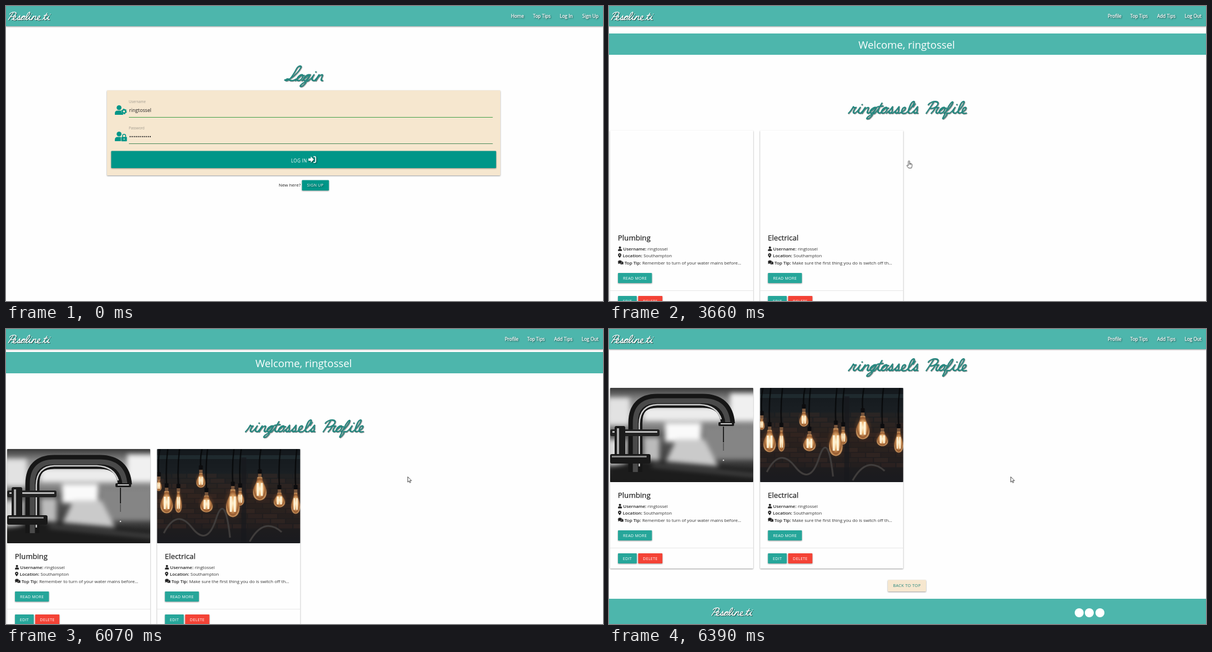
Write an HTML page that moves like this. It is 1064 px wide and 526 px high and loops after 8000 ms.

```html
<!DOCTYPE html>
<html lang="en">
<head>
<meta charset="utf-8">
<title>Login to profile</title>
<style>
html, body { margin: 0; width: 100%; height: 100%; overflow: hidden; background: #fefefe; }
svg { display: block; width: 1064px; height: 526px; font-family: "Open Sans", "Noto Sans", sans-serif; }
text { white-space: pre; }
.mid { text-anchor: middle; }
.caps { letter-spacing: .3px; fill: #fff; text-anchor: middle; }
.bold { font-weight: 600; fill: #222; }
.lift { filter: drop-shadow(0 1px 1px #0006); }
.glow { filter: drop-shadow(1px 1px 1px #0009); }
.blur { filter: blur(4px); }
.script { fill: none; stroke-linecap: round; stroke-linejoin: round; }
.heading { stroke: #26877f; stroke-width: 1.9; filter: drop-shadow(1.5px 1.5px .6px #0006); }
.brand { stroke: #fff; stroke-width: 1.7; filter: drop-shadow(1px 1px .6px #0008); }

.login, .profile, .status, .bulbs, .tap, .arrow, .hand, .click, .hover, .scroll {
  animation: 8s step-end infinite;
}
.login { animation-name: login; }
.profile { animation-name: profile; }
.status { animation-name: status; }
.bulbs { animation-name: bulbs; }
.tap { animation-name: tap; }
.arrow { animation-name: arrow; }
.hand { animation-name: hand; }
.click { animation-name: click; }
.hover { animation-name: hover; }
.scroll { animation-name: scroll; }
.cursor { animation: move 8s linear infinite; }

@keyframes login { 0% { opacity: 1 } 44.875%, 100% { opacity: 0 } }
@keyframes profile { 0% { opacity: 0 } 44.875%, 100% { opacity: 1 } }
@keyframes status { 0% { opacity: 0 } 46.625% { opacity: 1 } 51.625% { opacity: .6 } 52.5% { opacity: .25 } 53.375%, 100% { opacity: 0 } }
@keyframes bulbs { 0% { opacity: 0 } 49.125%, 100% { opacity: 1 } }
@keyframes tap { 0% { opacity: 0 } 50.75%, 100% { opacity: 1 } }
@keyframes arrow { 0% { opacity: 0 } 4.125% { opacity: 1 } 26% { opacity: 0 } 40% { opacity: 1 } 40.75% { opacity: 0 } 56.625%, 100% { opacity: 1 } }
@keyframes hand { 0% { opacity: 0 } 26% { opacity: 1 } 40% { opacity: 0 } 40.75% { opacity: 1 } 56.625%, 100% { opacity: 0 } }
@keyframes click { 0% { opacity: 0 } 40% { opacity: .85 } 40.75%, 100% { opacity: 0 } }
@keyframes hover { 0% { opacity: 0 } 26%, 100% { opacity: 1 } }
@keyframes scroll {
  0% { transform: none }
  75.875% { transform: translateY(-8px) }
  76.625% { transform: translateY(-29px) }
  77.5% { transform: translateY(-62px) }
  78.25% { transform: translateY(-92px) }
  79.125% { transform: translateY(-111px) }
  79.875%, 100% { transform: translateY(-117px) }
}
@keyframes move {
  0%, 4.125% { transform: translate(998px, 484px) }
  6.3% { transform: translate(905px, 443px) }
  8.5%, 11% { transform: translate(869px, 462px) }
  14.375%, 17% { transform: translate(873px, 453px) }
  21.875% { transform: translate(637px, 335.5px); animation-timing-function: ease-out }
  27.125%, 27.875% { transform: translate(537px, 279px) }
  28.75%, 55.875% { transform: translate(534.5px, 276px) }
  60.125%, 100% { transform: translate(715.5px, 263px) }
}
</style>
</head>
<body>
<script>
const USER = "ringtossel", BRAND = "Pesoline.ti", TEAL = "#4db6ac", DEEP = "#009688", SAND = "#f6e7cf";

// Script letters as relative strokes: each starts and ends on the baseline, so words are plain joins.
const STROKES = {
  e: "c4-2 6-4 6-6c0-3-4-3-4 1c0 5 3 6 7 5",
  i: "q3-3 4-8c-1 5-1 8 4 8m-3-12l.1 0m2.9 12",
  n: "q2-3 3-8l-1 8c1-5 3-8 5-8c3 0-1 8 4 8",
  l: "c4-4 6-10 6-14c0-4-4-3-4 3c0 7 0 11 4 11",
  t: "q3-5 4-14c-2 9-2 14 3 14m-7-9l7-1m0 10",
  s: "q4-4 5-9c0 3 3 5 2 8c-1 2-4 1-4-1m3 1q1 1 3 1",
  r: "q2-3 3-9q1 2 4 1c-2 4-2 8 2 8",
  o: "q2-3 6-8c-5-1-7 8-2 8c4 0 5-6 2-8q1 2 3 1m0 7",
  g: "q2-3 7-8c-6-1-8 8-3 8c2 0 3-3 4-8c-1 8-2 16-6 16c-4 0 0-6 7-8",
  f: "c4-4 7-11 6-15c-1-3-4 3-4 10l-1 12c1 3 5-4 3-7l4 0",
  L: "m-2-1c8 1 14-10 15-16c1-4-4-4-5 0c-1 8-3 17-7 17c-4 0-1-4 3-1c4 2 6 1 9-1m0 2",
  P: "m4 0c1-4 3-11 4-15m-6 3c2-6 15-6 13 1c-1 4-6 5-9 4m5 7",
  "'": "m2-13l-1 4m1 9",
  ".": "m2 0l.1 0m2.9 0",
  " ": "m8 0"
};

const script = (x, y, scale, word, cls) =>
  `<g class="${cls}"><path class="script" role="img" aria-label="${word}" transform="translate(${x} ${y}) scale(${scale}) skewX(-22)" d="M0 0${[...word].map(c => STROKES[c]).join("")}"/></g>`;
const text = (x, y, size, str, attrs = "") => `<text x="${x}" y="${y}" font-size="${size}" ${attrs}>${str}</text>`;
const rect = (x, y, w, h, fill, attrs = "") => `<rect x="${x}" y="${y}" width="${w}" height="${h}" fill="${fill}" ${attrs}/>`;
const path = (d, attrs) => `<path d="${d}" ${attrs}/>`;
const line = (d, color, width) => path(d, `fill="none" stroke="${color}" stroke-width="${width}"`);
const group = (x, y, body, cls = "") => `<g transform="translate(${x} ${y})"><g class="${cls}">${body}</g></g>`;
const button = (x, y, w, h, fill, label, size = 7, color = "#fff") =>
  rect(x, y, w, h, fill, 'rx="1" class="lift"') +
  text(x + w / 2, y + h / 2 + size * .37, size, label, `class="caps" style="fill:${color}"`);

const person = (x, y, s, fill) =>
  group(x, y, `<g transform="scale(${s})" fill="${fill}"><circle cx="7.5" cy="4.3" r="4.3"/><path d="M0 17v-2.5q0-5 5-5h5q5 0 5 5V17z"/></g>`);

const nav = items => `<g class="lift">${rect(0, 0, 1064, 36, TEAL)}</g>` +
  script(1, 24.5, .83, BRAND, "brand") +
  `<g class="glow" fill="#fff" stroke="#fff" stroke-width=".25">${items.map(([x, s]) => text(x, 21.3, 8.1, s)).join("")}</g>`;

function field(y, label, value, lineColor, badge) {
  return person(194, y + 26.5, 1, DEEP) + badge +
    text(219, y + 22, 6.2, label, 'fill="#a09a8e"') + value +
    rect(219, y + 47.5, 648.5, 1, lineColor);
}

const cog = group(210.3, 188, `<circle r="4.8" fill="${SAND}"/><circle r="3" fill="none" stroke="${DEEP}" stroke-width="2.4"/>
  <circle r="4.3" fill="none" stroke="${DEEP}" stroke-width="1.4" stroke-dasharray="2.25"/>`);
const lock = rect(204.7, 232, 12, 10, SAND) + rect(205.5, 233.5, 10, 7.7, DEEP, 'rx="1"') +
  line("M207.7 234v-2.5a2.8 2.8 0 0 1 5.6 0v2.5", DEEP, 1.5) + `<circle cx="210.5" cy="237.3" r="1.1" fill="${SAND}"/>`;
const enterIcon = group(539, 267.5, path("M0 4.2h4.2V.8L9.800 6.300 4.200 11.800V8.400H0z", 'fill="#fff"') +
  line("M9 1.2h2.3q1.5 0 1.5 1.5v7.2q0 1.5-1.5 1.5H9", "#fff", 1.8), "glow");

const loginPage = `<g class="login">` + rect(0, 0, 1064, 526, "#fefefe") +
  nav([[900, "Home"], [939.3, "Top Tips"], [987, "Log In"], [1027, "Sign Up"]]) +
  script(499, 133, 1.3, "Login", "heading") +
  rect(180, 150.5, 701, 151.5, SAND, 'rx="1" class="lift"') +
  field(150.5, "Username", text(219.5, 188.5, 8.7, USER, 'fill="#222"'), "#43a047", cog) +
  field(197.5, "Password", text(219.5, 236.2, 9.5, "•".repeat(11), 'fill="#222"'), "#4a8a5a", lock) +
  `<g class="hover">${rect(187.5, 260, 686, 30.5, "#0005", 'rx="1" style="filter:blur(1px)"')}</g>` +
  rect(187.5, 258.5, 686, 30.5, DEEP, 'rx="1" class="lift"') +
  text(522.2, 278.5, 8.1, "LOG IN", 'class="caps"') + enterIcon +
  text(486, 321.8, 8, "New here?", 'fill="#222"') +
  `<g class="lift">${rect(527.5, 310.5, 48, 18.5, DEEP, 'rx="1"')}</g>` +
  text(551.3, 322.4, 7, "SIGN UP", 'class="caps glow"') + `</g>`;

// Centre and half-size of each bulb.
const BULBS = [[3, 65, 5, 10], [17, 95, 11, 20], [38, 95, 6, 19], [78, 56, 8, 13], [88, 98, 11, 15],
  [148, 88, 7, 13], [135, 97, 12, 25], [183, 71, 12, 21], [218, 91, 10, 13], [247, 97, 8, 19]];

function bulbPhoto() {
  let bricks = "";
  for (let row = 0; row < 11; row++)
    for (let col = 0; col < 10; col++)
      bricks += rect(col * 27 - row % 2 * 13, 44 + row * 9, 25, 7.5, "#70452f", `opacity="${(.06 + (row * 7 + col * 5) % 4 * .04).toFixed(2)}"`);
  const pear = "M-.35-1C-.4-.4-1-.3-1 .3C-1 1.2 1 1.2 1 .3C1-.3 .4-.4 .35-1z";
  const lamps = BULBS.map(([x, y, w, h]) =>
    line(`M${x + 2} 0Q${x - 2} ${y / 3} ${x} ${y - h - 10}`, "#060708", 2) +
    rect(x - 3.5, y - h - 14, 7, 8, "#0c0c0e", 'rx="1.5"') +
    rect(x - 3, y - h - 6, 6, 7, "#77553c") +
    `<ellipse cx="${x}" cy="${y}" rx="${w * 1.4}" ry="${h * 1.2}" fill="url(#halo)"/>` +
    path(pear, `transform="translate(${x} ${y}) scale(${w} ${h})" fill="url(#lamp)"`) +
    line(`M${x - w * .3} ${y - h * .5}v${h * 1.1}M${x + w * .3} ${y - h * .5}v${h * 1.1}`, "#fff6dc", w * .3)).join("");
  return rect(0, 0, 255, 168, "url(#wall)") + bricks +
    rect(0, 11, 255, 7, "#26343a", 'opacity=".6"') + rect(150, 15, 9, 153, "#17191d", 'opacity=".7"') +
    line("M12 150Q35 105 62 140T105 125T130 158M165 165Q190 120 222 148", "#413e3d", 3) + lamps;
}

function tapPhoto() {
  const spout = "M45 150V62Q45 23 84 23H165Q207 23 210 64";
  return rect(0, 0, 255, 168, "url(#room)") +
    `<g class="blur">` +
    rect(-5, 18, 40, 48, "#e2e2e2") + rect(60, 34, 140, 24, "#ececec") + rect(214, 10, 50, 48, "#f0f0f0") +
    rect(165, 68, 95, 60, "#858585") + rect(98, 62, 64, 34, "#fafafa") +
    path("M118 92h50l28 54H92z", 'fill="#cacaca"') +
    rect(-5, 92, 34, 46, "#dadada") + rect(60, 88, 28, 44, "#bbb") +
    path("M60 128L260 146V170H0V140z", 'fill="#1c1c1c"') + line("M75 138L260 156", "#777", 3) + `</g>` +
    line(spout, "#161616", 25) + line(spout, "#4a4a4a", 9) +
    line("M52 140V64Q53 31 84 30H160Q190 31 198 56", "#cfcfcf", 2.5) +
    rect(193, 61, 28, 7, "#1c1c1c", 'rx="2"') + rect(197, 63, 20, 2, "#ccc") +
    rect(0, 74, 88, 12, "#222", 'rx="3"') + rect(4, 77, 80, 3, "#bbb") +
    rect(8, 68, 19, 64, "#1b1b1b", 'rx="3"') + rect(12, 72, 4, 54, "#aaa") +
    rect(0, 118, 72, 17, "#191919", 'rx="3"') + rect(3, 121, 62, 3, "#888") +
    line("M202 69V97", "#222", 2) + line("M202 98V112", "#444", 1.2) +
    `<circle cx="202" cy="129" r="1.8" fill="#ddd" stroke="#444" stroke-width=".7"/>`;
}

const pin = path("M3 0a2.9 2.9 0 0 0-2.9 2.9Q.1 4.5 3 8 5.9 4.5 5.9 2.9A2.9 2.9 0 0 0 3 0zm0 1.9a1 1 0 1 1 0 2 1 1 0 0 1 0-2z", 'fill="#222"');
const chat = `<ellipse cx="6.3" cy="4.7" rx="3.4" ry="2.7" fill="#222"/><path d="M7 6l2.7 2-.7-3z" fill="#222"/>
  <ellipse cx="3.5" cy="3" rx="3.7" ry="3" fill="#222" stroke="#fefefe" stroke-width=".5"/><path d="M0 6.7l1-3 2 2z" fill="#222"/>`;

function card(x, title, tip, photo, cls) {
  const row = (tx, y, label, value) =>
    text(tx, y, 7.9, `<tspan class="bold">${label}:</tspan> ${value}`, 'fill="#333"');
  return group(x, 222,
    rect(0, 0, 255, 322, "#fefefe", 'rx="1" class="lift"') +
    `<g class="${cls}" clip-path="url(#frame)">${photo}</g>` +
    text(13.8, 196, 13.2, title, 'fill="#222" stroke="#222" stroke-width=".25"') +
    person(14, 206.8, .47, "#222") + row(23.3, 213.8, "Username", USER) +
    group(14, 219, pin) + row(22.6, 226.2, "Location", "Southampton") +
    group(14, 231.3, chat) + row(25.7, 238.5, "Top Tip", tip) +
    button(14, 254, 60.5, 18, "#26a69a", "READ MORE") +
    rect(0, 285, 255, .7, "#ddd") +
    button(14, 295, 33.5, 18, "#26a69a", "EDIT") +
    button(50, 295, 43.2, 18, "#f44336", "DELETE"));
}

const profilePage = `<g class="profile">` + rect(0, 0, 1064, 526, "#fefefe") +
  `<g class="scroll">` +
  rect(0, 49, 1064, 38, TEAL) + text(530.5, 75.5, 18.4, `Welcome, ${USER}`, 'class="mid" fill="#fff"') +
  script(427, 191, 1.27, `${USER}'s Profile`, "heading") +
  card(2, "Plumbing", "Remember to turn of your water mains before...", tapPhoto(), "tap") +
  card(269.3, "Electrical", "Make sure the first thing you do is switch off th...", bulbPhoto(), "bulbs") +
  button(497, 564.5, 68, 20.5, SAND, "BACK TO TOP", 7.4, "#26877f") +
  rect(0, 598, 1064, 45, TEAL) + script(180, 627.5, .81, BRAND, "brand") +
  [838, 856, 875].map(x => `<circle cx="${x}" cy="623" r="8" fill="#fff"/>`).join("") + `</g>` +
  nav([[889, "Profile"], [929, "Top Tips"], [977, "Add Tips"], [1026, "Log Out"]]) +
  `<g class="status">${rect(-1, 514, 356, 13, "#dee1e6", 'stroke="#c4c7cb" stroke-width=".6"')}` +
  text(0, 522.6, 6.2, "Waiting for 4310-velvet-weevil-3kvdm5t2.qx-na07.tallod.zz...", 'fill="#555"') + `</g></g>`;

const cursor = `<circle class="click" cx="533.5" cy="275.5" r="6.5" fill="#a9cf38"/><g class="cursor" stroke-linejoin="round">` +
  path("M.5 .5V10L2.7 8 4.2 11.3 5.7 10.6 4.2 7.4H7.2z", 'class="arrow" fill="#fff" stroke="#333" stroke-width=".9"') +
  path("M-1 1.3a1.2 1.2 0 0 1 2.4 0V4.7L4.3 5.2Q5.8 5.6 5.6 7.2V9.3L4.5 13H-.5L-3.8 8.6Q-3.4 6.9-1 8.5zM1.4 4.7V7M3.3 5V7", 'class="hand" fill="#fff" stroke="#333" stroke-width=".9"') + `</g>`;

const stops = (...list) => list.map(([o, c, a = 1]) => `<stop offset="${o}" stop-color="${c}" stop-opacity="${a}"/>`).join("");
const defs = `<defs><clipPath id="frame"><rect width="255" height="168" rx="1"/></clipPath>
  <linearGradient id="wall" x2="0" y2="1">${stops([0, "#14191d"], [.25, "#1a1f23"], [.5, "#271f1d"], [1, "#1a1b1f"])}</linearGradient>
  <linearGradient id="room" x2="0" y2="1">${stops([0, "#3a3a3a"], [.12, "#888"], [.3, "#b5b5b5"], [.5, "#5a5a5a"], [.8, "#3a3a3a"], [1, "#151515"])}</linearGradient>
  <radialGradient id="lamp">${stops([0, "#fff3cf"], [.45, "#f0b876"], [.85, "#94592f"], [1, "#d09a62"])}</radialGradient>
  <radialGradient id="halo">${stops([0, "#e89a4e", .5], [1, "#a85c26", 0])}</radialGradient></defs>`;

document.body.innerHTML = `<svg viewBox="0 0 1064 526">${defs}${loginPage}${profilePage}${cursor}</svg>`;
</script>
</body>
</html>
```
